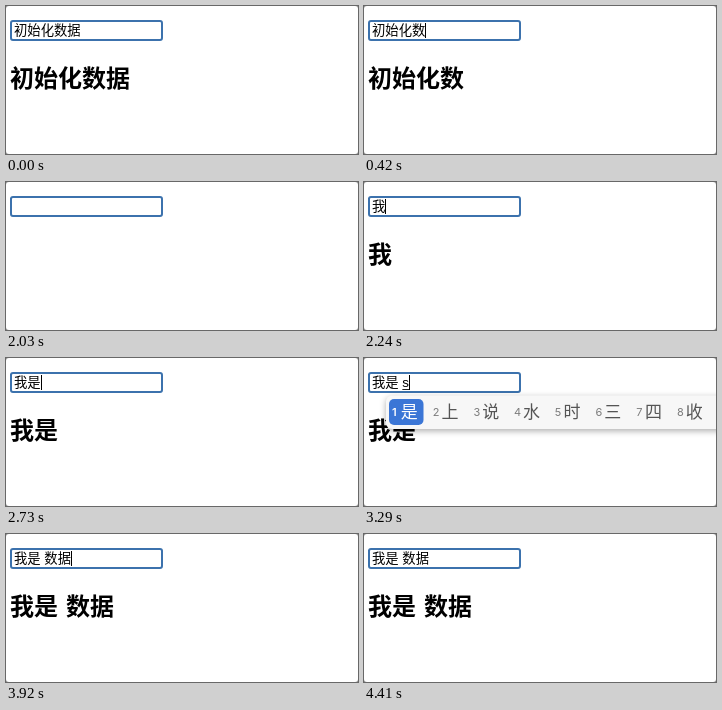
Write an HTML page that moves like this. It is 352x148 px and loops after 4.48 s.

```html
<!DOCTYPE html>
<html lang="zh-CN">
<head>
<meta charset="utf-8">
<title>输入框双向绑定</title>
<style>
  html, body { margin: 0; width: 100%; height: 100%; overflow: hidden; background: #8c8c8c; }
  svg { display: block; }
  text { white-space: pre; }
  .field { font: 13.333px "Liberation Sans", "Noto Sans CJK SC", sans-serif; }
  .title { font: bold 24px "Noto Sans CJK SC", "Noto Sans CJK", sans-serif; word-spacing: 2.6px; }
  .word { font: 17px "Noto Sans CJK SC", "Noto Sans CJK", sans-serif; fill: #555; }
  .key { font: 11px "Inter", "Liberation Sans", sans-serif; fill: #7c7c7c; }
  .on { fill: #fff; }
  .key.on { font-weight: 600; }
  .panel { filter: drop-shadow(0 2px 3px rgba(0, 0, 0, .32)); }
</style>
</head>
<body>
<svg width="352" height="148" viewBox="0 0 352 148">
  <defs>
    <g id="tree">
      <path d="M-1.5 4h3v5h-3z" fill="#76513a"/>
      <path d="M0-9L4-3H2.6L6 1.5H4L8 6.5Q0 8.5-8 6.5L-4 1.5H-6L-2.6-3H-4Z" fill="#3f8050"/>
      <path d="M0-9L1 6.8Q-4 7.4-8 6.5L-4 1.5H-6L-2.6-3H-4Z" fill="#559463"/>
    </g>
    <g id="book">
      <path d="M-10-5L0-4L10-5V8L0 7L-10 8Z" fill="#3d6c8c"/>
      <path d="M0-5Q-4-9-9-6V6Q-4 4 0 7Q4 4 9 6V-6Q4-9 0-5Z" fill="#f3eee3" stroke="#aaa398" stroke-width=".6"/>
      <path d="M0-5V7M-7-3.5Q-4-5-2-3M-7-.5Q-4-2-2 0M-7 2.5Q-4 1-2 3M7-3.5Q4-5 2-3M7-.5Q4-2 2 0M7 2.5Q4 1 2 3" fill="none" stroke="#77736c" stroke-width=".8"/>
    </g>
  </defs>
  <rect width="352" height="148" rx="3" fill="#fff"/>
  <rect x="5" y="15" width="151" height="19" rx="2" fill="#fff" stroke="#3c72ad" stroke-width="2"/>
  <text id="value" class="field" x="8" y="29"></text>
  <rect id="underline" y="31" height="1" fill="#222"/>
  <rect id="caret" y="17" width="1" height="15"/>
  <text id="title" class="title" x="4" y="80.5"></text>
  <g id="popup"></g>
</svg>
<script>
const LOOP = 4480;
const KEY_STEP = 40.7;
const $ = id => document.getElementById(id);

const words = {
  w: "我 为 无 玩 完 晚 问 万 外",
  wo: "我 握 窝 卧 沃 喔 涡 蜗 斡",
  s: "是 上 说 水 时 三 四 收 所",
  sh: "是 上 说 水 时 事 使 谁 双",
  shi: "是 时 事 使 市 式 十 师 试",
  shu: "树 tree 书 book 数 输 熟 属 叔",
  "shu j": "数据 书籍 树 书 数 输 熟 属",
  "shu ju": "数据 书局 树 书 数 输 熟 属"
};

// start time, committed text, caret shown, pinyin being composed
const steps = [
  [0, "初始化数据", 0],
  [420, "初始化数", 1],
  [630, "初始化", 1],
  [770, "初始", 1],
  [910, "初", 1],
  [1120, "", 0],
  [1470, "", 1],
  [2030, "", 0],
  [2170, "", 1, "wo"],
  [2240, "我", 1],
  [2380, "我", 1, "s"],
  [2450, "我", 1, "sh"],
  [2520, "我", 1, "shi"],
  [2730, "我是", 1],
  [3010, "我是 ", 1],
  [3290, "我是 ", 1, "s"],
  [3430, "我是 ", 1, "sh"],
  [3570, "我是 ", 1, "shu"],
  [3780, "我是 ", 1, "shu j"],
  [3850, "我是 ", 1, "shu ju"],
  [3920, "我是 数据", 1],
  [4410, "我是 数据", 0]
];

const pen = document.createElement("canvas").getContext("2d");
pen.font = '13.333px "Liberation Sans", "Noto Sans CJK SC", sans-serif';
const width = s => pen.measureText(s).width;

function candidates(pinyin, left) {
  let x = left + 6;
  let out = `<rect class="panel" x="${left}" y="37.5" width="620" height="33.5" rx="6" fill="#f7f7f7"/>`;
  words[pinyin].split(" ").forEach((word, i) => {
    const emoji = word === "tree" || word === "book";
    const extra = emoji ? 6.5 : (word.length - 1) * 17;
    const on = i ? "" : " on";
    if (!i) out += `<rect x="${x - 3}" y="41" width="${34.5 + extra}" height="26" rx="5" fill="#3b76d6"/>`;
    out += `<text class="key${on}" x="${x}" y="58">${i + 1}</text>`;
    out += emoji
      ? `<use href="#${word}" x="${x + 21}" y="53.5"/>`
      : `<text class="word${on}" x="${x + 8.8}" y="60">${word}</text>`;
    x += KEY_STEP + extra;
  });
  return out;
}

function show([, text, caret, pinyin = ""]) {
  const start = 8 + width(text);
  const size = width(pinyin);
  $("value").textContent = text + pinyin;
  $("title").textContent = text;
  $("caret").setAttribute("x", Math.round(start + size));
  $("caret").setAttribute("opacity", caret);
  $("underline").setAttribute("x", start);
  $("underline").setAttribute("width", size);
  $("popup").innerHTML = pinyin ? candidates(pinyin, Math.round(start - 16.5)) : "";
}

let current;
function frame() {
  const t = performance.now() % LOOP;
  const step = steps.findLast(s => s[0] <= t);
  if (step !== current) show(current = step);
  requestAnimationFrame(frame);
}
frame();
</script>
</body>
</html>
```
